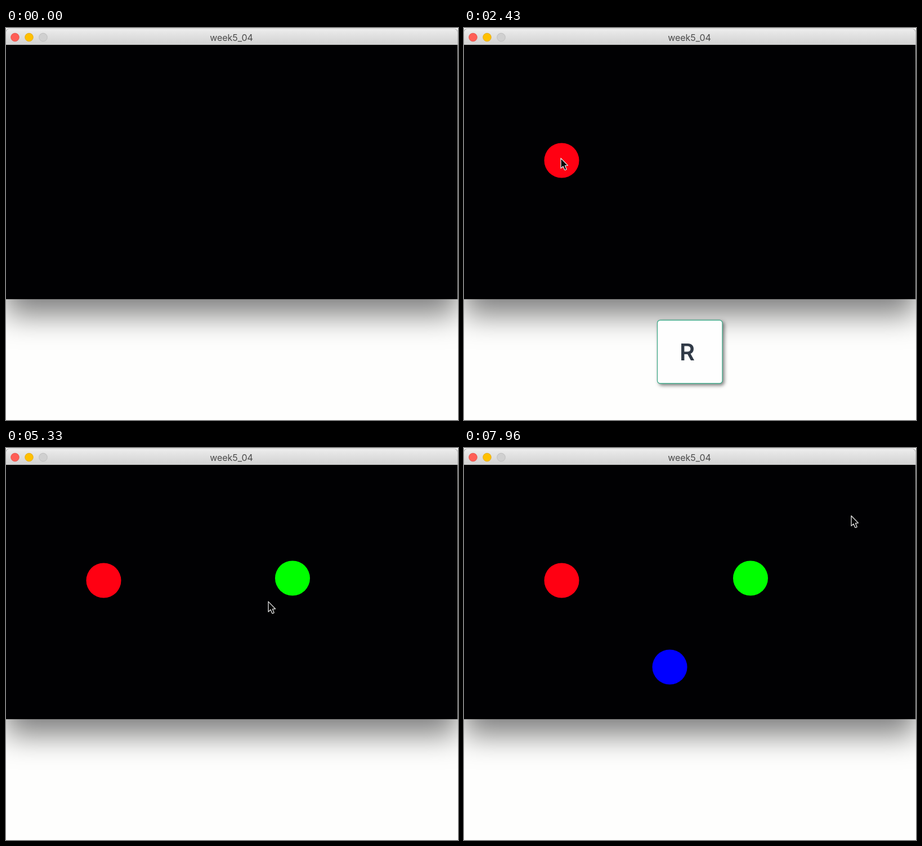
Write an HTML page that moves like this. It is 803 px wide and 697 px high and loops after 8000 ms.

```html
<!DOCTYPE html>
<html lang="en">
<head>
<meta charset="utf-8">
<title>week5_04</title>
<style>
  html, body { margin: 0; width: 100%; height: 100%; overflow: hidden; background: #fefefd; }
  #window {
    position: absolute; left: 0; top: 2px; width: 802px; height: 480px;
    border-radius: 5px 5px 0 0; background: #010103;
    box-shadow: 0 28px 52px rgba(0, 0, 0, .5), 0 0 0 1px rgba(0, 0, 0, .18);
  }
  #bar {
    height: 28px; box-sizing: border-box; border-radius: 5px 5px 0 0;
    border-top: 1px solid #f6f6f6; border-bottom: 1px solid #c4c4c4;
    background: linear-gradient(#ebebeb, #d2d2d2);
  }
  svg { position: absolute; left: 0; top: 0; }
  text { font-family: Inter, "Open Sans", sans-serif; text-anchor: middle; }
  #key rect { filter: drop-shadow(3px 3px 3px rgba(0, 0, 0, .5)); }
</style>
</head>
<body>
<div id="window"><div id="bar"></div></div>
<svg width="803" height="697" viewBox="0 0 803 697">
  <g stroke-width=".8">
    <circle cx="16" cy="16.5" r="7.3" fill="#ff5f57" stroke="#e2493f"/>
    <circle cx="41" cy="16.5" r="7.3" fill="#ffc000" stroke="#dfa212"/>
    <circle cx="66" cy="16.5" r="7.3" fill="#d0d0d0" stroke="#b8b8b8"/>
  </g>
  <text x="400.5" y="22.5" font-size="16" fill="#4a4a4a">week5_04</text>
  <g id="dots"></g>
  <g id="key">
    <rect x="343.5" y="519.5" width="115.5" height="112.5" rx="5" fill="#fefefe" stroke="#42ac8b" stroke-width="1.3"/>
    <text id="letter" y="591" font-size="41.5" font-weight="600" fill="#303a47"></text>
  </g>
  <path id="cursor" d="M.5 .5V18.6L4.5 14.9L7.2 21.2Q9 22 10.6 20.2L8 13.8L13 13.4Z"
        fill="#050505" stroke="#d6d6d6" stroke-width="1.4" stroke-linejoin="round"/>
</svg>
<script>
const LOOP = 8000, CURSOR_IN = 430, KEY_HOLD = 1140;
const $ = id => document.getElementById(id);

// The pointer travels to each stop, a key is pressed, then the dot appears.
const stops = [
  { letter: "R", color: "#ff0012", x: 173.5, y: 235.5, leave: 400, arrive: 1100, press: 1560, dot: 2430 },
  { letter: "G", color: "#00ff00", x: 509, y: 231.5, leave: 3100, arrive: 3730, press: 3860, dot: 4660 },
  { letter: "B", color: "#0000ff", x: 365.5, y: 389.5, leave: 5200, arrive: 5560, press: 5860, dot: 6730 }
];
const entry = { x: 260, y: 4 };
const exit = { x: 689.5, y: 124.5, leave: 7110, arrive: 7960 };
const route = [entry, ...stops, exit];

const show = (el, on) => el.setAttribute("visibility", on ? "visible" : "hidden");
const ease = u => (1 - Math.cos(Math.PI * u)) / 2;
const mix = (a, b, u) => a + (b - a) * u;

for (const s of stops) {
  s.el = document.createElementNS("http://www.w3.org/2000/svg", "circle");
  for (const [name, value] of Object.entries({ cx: s.x, cy: s.y, r: 31, fill: s.color }))
    s.el.setAttribute(name, value);
  $("dots").append(s.el);
}

function pointer(t) {
  const i = Math.max(1, route.findLastIndex(r => t >= r.leave));
  const from = route[i - 1], to = route[i];
  const u = ease(Math.max(0, Math.min(1, (t - to.leave) / (to.arrive - to.leave))));
  // the last trip swings out to the right before it settles
  const swing = to === exit ? 560 * u * u * (1 - u) + 115 * u * (1 - u) : 0;
  return [mix(from.x, to.x, u) + swing - 2, mix(from.y, to.y, u) - 4.5];
}

function draw(t) {
  for (const s of stops) show(s.el, t >= s.dot);

  const key = stops.find(s => t >= s.press && t < s.press + KEY_HOLD);
  show($("key"), key);
  if (key) {
    $("letter").textContent = key.letter;
    $("letter").setAttribute("x", key.letter === "G" ? 401.5 : 396.5);
  }

  show($("cursor"), t >= CURSOR_IN);
  $("cursor").setAttribute("transform", `translate(${pointer(t)})`);
}

let begin;
function tick(now) {
  begin ??= now;
  draw((now - begin) % LOOP);
  requestAnimationFrame(tick);
}
draw(0);
requestAnimationFrame(tick);
</script>
</body>
</html>
```
